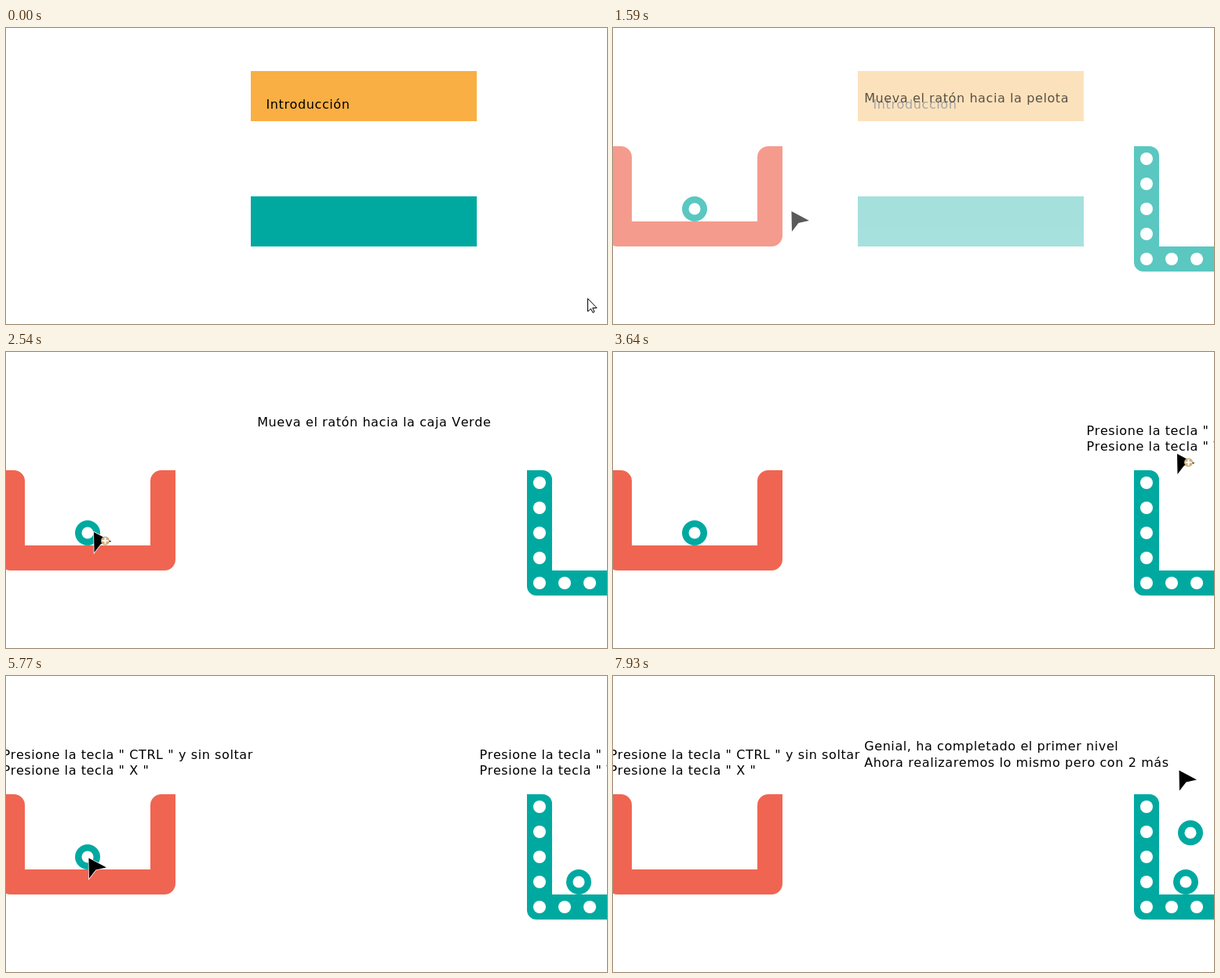
These frames come from a looping animation (766x378 px, 8000 ms). An HTML page:

```html
<!DOCTYPE html>
<html lang="es">
<head>
<meta charset="utf-8">
<style>
  html, body { margin: 0; width: 100%; height: 100%; overflow: hidden; background: #fff; }
  svg { display: block; }
  text { font: 16px "DejaVu Sans", sans-serif; letter-spacing: .6px; font-kerning: none; }
</style>
</head>
<body>
<svg width="766" height="378" viewBox="0 0 766 378">
  <defs>
    <g id="ball">
      <circle r="16" fill="#00a9a0"/>
      <circle r="7.5" fill="#fff"/>
    </g>
  </defs>

  <g id="menu">
    <path fill="#f9af43" d="M312 55h288v64H312z"/>
    <path fill="#00a9a0" d="M312 215h288v64H312z"/>
  </g>

  <g id="game">
    <path fill="#f06551" d="M-8 151H10a14 14 0 0 1 14 14V247H184V165a14 14 0 0 1 14-14H216V265a14 14 0 0 1-14 14H6a14 14 0 0 1-14-14z"/>
    <path fill="#00a9a0" d="M664 151H684a12 12 0 0 1 12 12V279H770V311H676a12 12 0 0 1-12-12z"/>
    <g id="holes" fill="#fff"></g>
    <g id="balls"></g>
    <g id="texts"></g>
    <g id="arrow">
      <path d="M0 0L22.5 12L9 15L.5 26z" stroke="#fff" stroke-width="1.5" paint-order="stroke"/>
      <g id="carry" transform="translate(14.5 11)">
        <circle r="5.5" fill="#d2ae78"/>
        <path d="M-4 0H4M0-4V4" stroke="#fff" stroke-width="2"/>
      </g>
    </g>
  </g>

  <path id="pointer" fill="#fff" stroke="#000" d="M.5.5V17L4.5 13.5L7 18.5L9 17.5L6.7 12.5H12z"/>
</svg>
<script>
const LOOP = 8000, FADE = 915, COPY = 2540, PASTE = 3840, CUT = 5970, PASTE2 = 7650;
const $ = id => document.getElementById(id);
const clamp = v => Math.max(0, Math.min(1, v));
const add = (id, html) => {
  $(id).insertAdjacentHTML('beforeend', html);
  return $(id).lastElementChild;
};
const show = (el, on) => el.setAttribute('visibility', on ? 'visible' : 'hidden');
const move = (el, x, y) => el.setAttribute('transform', `translate(${x} ${y})`);

const timed = [];
function label(id, x, y, str, from = 0, to = LOOP) {
  timed.push({ el: add(id, `<text x="${x}" y="${y}">${str}</text>`), from, to });
}
function title(str, from, to, y = 95) {
  label('texts', 320.2, y, str, from, to);
}
function keyHint(x, key, from, to) {
  label('texts', x, 106, 'Presione la tecla " CTRL " y sin soltar', from, to);
  label('texts', x, 126, `Presione la tecla " ${key} "`, from, to);
}

label('menu', 331.5, 103, 'Introducción');
title('Mueva el ratón hacia la pelota', 0, COPY);
title('Mueva el ratón hacia la caja Verde', COPY, 3180);
title('Genial, ha completado el primer nivel', PASTE2);
title('Ahora realizaremos lo mismo pero con 2 más', PASTE2, LOOP, 116);
keyHint(-4.5, 'C', 2070, COPY);
keyHint(-4.5, 'X', 5770);
keyHint(603.5, 'V', 3180, PASTE2);

for (let i = 0; i < 7; i++)
  add('holes', `<circle r="8" cx="${680 + 32 * Math.max(0, i - 4)}" cy="${167 + 32 * Math.min(i, 4)}"/>`);

// Each ball falls from y to floor once it appears
const balls = [
  { x: 104, y: 192, floor: 231, from: FADE, to: CUT },
  { x: 730, y: 144, floor: 263, from: PASTE, to: LOOP },
  { x: 736, y: 137.5, floor: 263, from: PASTE2, to: LOOP }
];
for (const b of balls) b.el = add('balls', '<use href="#ball"/>');
timed.push(...balls);

// Mouse strokes: start, end, target x y, optional curve control x y
const home = [741, 345];
const strokes = [
  [70, 820, 491, 101],
  [920, 1100, 509, 115],
  [1100, 2140, 112, 230, 280, 267],
  [2670, 3230, 742, 165, 400, 28],
  [3360, 3640, 719, 130],
  [PASTE, 4750, 518, 173],
  [5150, 5840, 100, 233, 320, 215],
  [CUT, 6740, 654, 80.5, 187, 63],
  [6740, 7400, 734, 133],
  [7580, 7930, 721.5, 120.5]
];
function mouse(t) {
  let [x, y] = home;
  for (const [from, to, x2, y2, cx = (x + x2) / 2, cy = (y + y2) / 2] of strokes) {
    const u = Math.sin(clamp((t - from) / (to - from)) * Math.PI / 2);
    const bend = (a, c, b) => (1 - u) ** 2 * a + 2 * u * (1 - u) * c + u * u * b;
    x = bend(x, cx, x2);
    y = bend(y, cy, y2);
    if (u < 1) break;
  }
  return [x, y];
}

function draw(t) {
  const fade = clamp((t - FADE) / 1040);
  $('menu').setAttribute('opacity', 1 - fade);
  $('game').setAttribute('opacity', fade);

  for (const { el, from, to } of timed) show(el, t >= from && t < to);
  show($('carry'), (t >= COPY && t < PASTE) || (t >= CUT && t < PASTE2));
  show($('pointer'), t < FADE);

  for (const b of balls) {
    const s = Math.max(0, Math.min(t, 7930) - b.from) / 1000;
    move(b.el, b.x, Math.min(b.floor, b.y + 800 * s * s));
  }

  const [x, y] = mouse(t);
  move($('arrow'), x, y);
  move($('pointer'), x, y);
}

const start = performance.now();
function tick() {
  draw((performance.now() - start) % LOOP);
  requestAnimationFrame(tick);
}
tick();
</script>
</body>
</html>
```
